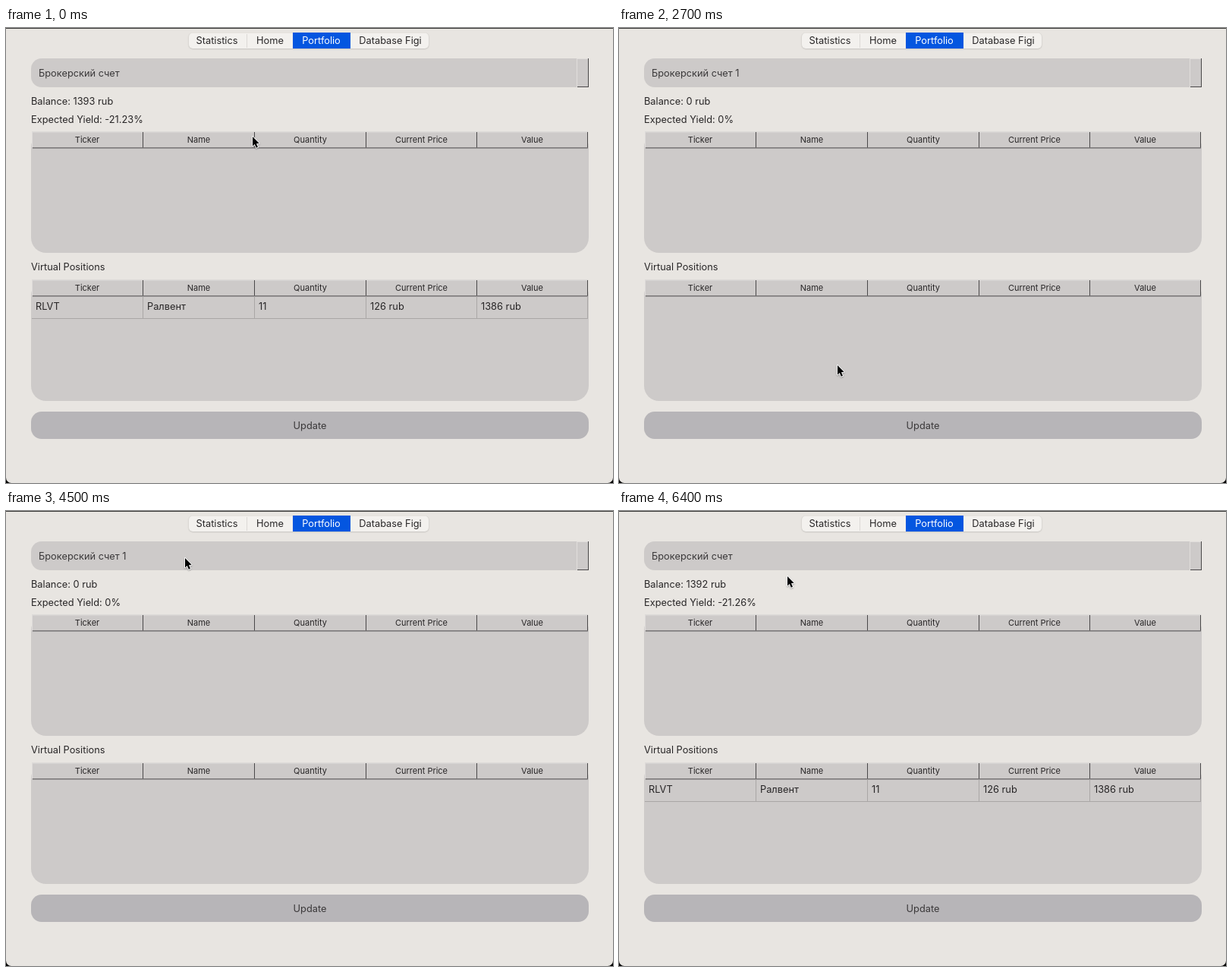
An HTML page with a canvas that plays this animation: 800x599 px, repeating every 6.5 s.

```html
<!DOCTYPE html>
<html lang="en">
<head>
<meta charset="utf-8">
<title>Portfolio</title>
<style>
  html, body { margin: 0; width: 100%; height: 100%; overflow: hidden; background: #e8e5e1; }
  canvas { display: block; }
</style>
</head>
<body>
<canvas id="stage" width="800" height="599"></canvas>
<script>
const ctx = document.getElementById('stage').getContext('2d');
const LOOP = 6500, STEP = 100;
const INK = '#3b393a', DARK = '#282627';
const PANEL = '#cdcac9', LINE = '#4a4849', LIGHT = '#e0dddb', GRID = '#aaa7a6';
const HEADS = ['Ticker', 'Name', 'Quantity', 'Current Price', 'Value'];
const ROW = ['RLVT', 'Ралвент', '11', '126 rub', '1386 rub'];
const ACCOUNTS = ['Брокерский счет', 'Брокерский счет 1'];

// Pointer moves; times count in steps
const HOME = { x: 324, y: 142 };
const MOVES = [
  { from: 0, to: 6, x: 250, y: 58 },
  { from: 9, to: 14, x: 213, y: 72 },
  { from: 22, to: 25, x: 271, y: 304 },
  { from: 26, to: 27, x: 287, y: 443 },
  { from: 27, to: 30, x: 289, y: 571 },
  { from: 30, to: 32, x: 285, y: 520 },
  { from: 37, to: 45, x: 235, y: 61 },
  { from: 45, to: 47, x: 230, y: 57 },
  { from: 49, to: 52, x: 207, y: 38 },
  { from: 63, to: 64, x: 221, y: 85 }
];

// Each popup opens over the chosen account, then fades once another is picked
const POPUPS = [
  { open: 6, pick: 18, close: 21, top: 41, current: 0 },
  { open: 46, pick: 57, close: 61, top: 23, current: 1 }
];

const smooth = k => k * k * (3 - 2 * k);
const within = (v, a, b) => v >= a && v < b;

function pointerAt(n) {
  return MOVES.reduce((p, m) => {
    const k = smooth(Math.min(1, Math.max(0, (n - m.from) / (m.to - m.from))));
    return { x: p.x + (m.x - p.x) * k, y: p.y + (m.y - p.y) * k };
  }, HOME);
}

// Five columns share 733 px; the spare pixels go to the first three
const colX = i => 34 + 146 * i + Math.min(i, 3);

function rect(x, y, w, h, color) {
  ctx.fillStyle = color;
  ctx.fillRect(x, y, w, h);
}

function round(x, y, w, h, r, color) {
  ctx.fillStyle = color;
  ctx.beginPath();
  ctx.roundRect(x, y, w, h, r);
  ctx.fill();
}

function shadow(alpha, blur, drop) {
  ctx.shadowColor = `rgba(0,0,0,${alpha})`;
  ctx.shadowBlur = blur;
  ctx.shadowOffsetY = drop;
}

function text(s, x, y, { size = 12.8, align = 'left', color = DARK } = {}) {
  ctx.font = `${size}px Inter, "Open Sans", sans-serif`;
  ctx.textAlign = align;
  ctx.fillStyle = color;
  ctx.fillText(s, x, y);
}

function drawWindow() {
  rect(0, 0, 800, 599, '#000');
  round(0, 0.7, 800, 598.3, [0, 0, 7, 7], '#e8e5e1');
}

function drawTabs() {
  ctx.save();
  shadow(0.22, 2, 0.5);
  round(241, 6.5, 316, 20.5, 5, '#f3f1ee');
  ctx.restore();
  rect(317, 8, 1, 18, '#dcd9d6');
  rect(378, 6, 76, 21, '#0456e0');
  const tabs = { Statistics: 278, Home: 348, Portfolio: 415.5, 'Database Figi': 506.5 };
  for (const [name, x] of Object.entries(tabs))
    text(name, x, 21, { align: 'center', color: name === 'Portfolio' ? '#fff' : DARK });
}

function drawCombo(label) {
  round(33, 40, 735, 38, [14, 0, 0, 14], PANEL);
  rect(752, 40, 1, 38, LIGHT);
  rect(752, 40, 16, 1, LIGHT);
  rect(767, 40, 1, 38, LINE);
  rect(753, 77, 15, 1, LINE);
  text(label, 43, 64, { color: INK });
}

function drawTable(y, row) {
  round(33, y, 735, 159, 20, PANEL);
  rect(34, y - 0.5, 733, 21, PANEL);
  rect(34, y - 0.5, 732, 1, LIGHT);
  rect(34, y, 1, 20, LIGHT);
  rect(35, y + 20.4, 732, 1, LINE);
  if (row) rect(34, y + 50, 733, 1, GRID);
  HEADS.forEach((head, i) => {
    const left = colX(i), edge = colX(i + 1) - 1;
    rect(edge, y, 1, 20.4, LINE);
    text(head, (left + edge) / 2, y + 14, { size: 11, align: 'center' });
    if (!row) return;
    rect(edge, y + 21.4, 1, 28.6, GRID);
    text(row[i], left + 5, y + 39);
  });
}

function drawButton(color) {
  round(33, 505, 735, 36, 14, color);
  text('Update', 400.5, 528, { align: 'center', color: INK });
}

function drawCheck(x, y) {
  ctx.strokeStyle = INK;
  ctx.lineWidth = 1.3;
  ctx.lineCap = 'round';
  ctx.beginPath();
  ctx.moveTo(x, y + 1);
  ctx.lineTo(x + 3, y + 4.5);
  ctx.lineTo(x + 9, y - 5);
  ctx.stroke();
}

function drawPopup({ pick, close, top, current }, n, pointerY) {
  const picked = n >= pick;
  ctx.save();
  ctx.globalAlpha = picked ? (close - n) / (close - pick) : 1;
  ctx.save();
  shadow(0.4, 12, 3);
  round(25.5, top, 718, 56.5, 4, '#2d2a2b');
  ctx.restore();
  rect(26, top + 10, 717, 36, '#e8e6e1');
  ACCOUNTS.forEach((name, i) => {
    const y = top + 10 + i * 18;
    if (!picked && within(pointerY, y, y + 18)) rect(26, y, 717, 18, PANEL);
    text(name, 51, y + 14, { color: INK });
    if (picked || i === current) drawCheck(31, y + 10);
  });
  ctx.restore();
}

function drawPointer({ x, y }) {
  ctx.save();
  ctx.translate(Math.round(x) + 1, Math.round(y) + 1);
  ctx.scale(0.92, 0.92);
  ctx.beginPath();
  const shape = [[0, 0], [0, 13.5], [3, 10.8], [5.2, 16], [7.6, 15], [5.4, 10], [9.4, 9.6]];
  shape.forEach(p => ctx.lineTo(...p));
  ctx.closePath();
  shadow(0.3, 2, 1);
  ctx.lineJoin = 'round';
  ctx.lineWidth = 2;
  ctx.strokeStyle = '#fff';
  ctx.stroke();
  ctx.shadowColor = 'transparent';
  ctx.fillStyle = '#000';
  ctx.fill();
  ctx.restore();
}

function draw(n) {
  const pointer = pointerAt(n);
  const [first, second] = POPUPS;
  const empty = within(n, first.pick, second.pick);
  const late = n >= second.pick;
  const hover = within(pointer.y, 505, 541);
  const pressed = within(n, 33, 36);
  const popup = POPUPS.find(p => within(n, p.open, p.close));

  drawWindow();
  drawTabs();
  drawCombo(ACCOUNTS[empty ? 1 : 0]);
  text(`Balance: ${empty ? 0 : late ? 1392 : 1393} rub`, 33, 101);
  text(`Expected Yield: ${empty ? '0' : late ? '-21.26' : '-21.23'}%`, 33, 125);
  drawTable(137, null);
  text('Virtual Positions', 33, 319);
  drawTable(332, empty ? null : ROW);
  drawButton(pressed ? '#8a888a' : hover ? '#a19fa2' : '#b7b5b8');
  if (popup) drawPopup(popup, n, pointer.y);
  drawPointer(pointer);
}

const start = performance.now();
function tick() {
  const t = (performance.now() - start) % LOOP;
  draw(Math.floor(t / STEP));
  requestAnimationFrame(tick);
}
tick();
</script>
</body>
</html>
```
